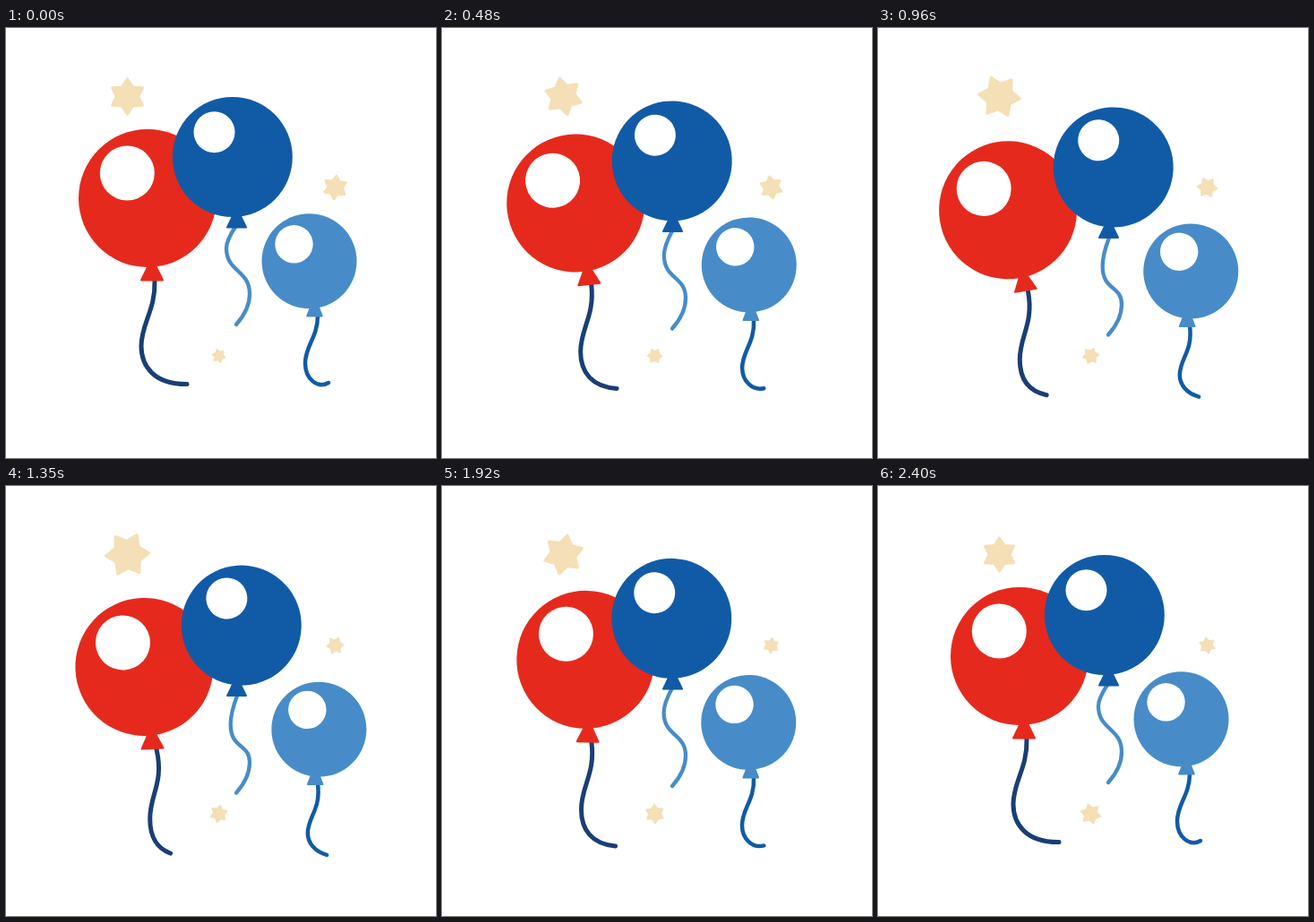
Animation of 480x480 px, one loop 2.43 s. Source, as an HTML page with a canvas:

```html
<!DOCTYPE html>
<html lang="en">
<head>
<meta charset="utf-8">
<title>Balloons</title>
<style>
  html, body { margin: 0; height: 100%; overflow: hidden; background: #fff; }
  canvas { display: block; }
</style>
</head>
<body>
<canvas id="stage" width="480" height="480"></canvas>
<script>
const ctx = document.getElementById('stage').getContext('2d');
const LOOP = 2430, STEP = 30;
const RED = '#e52a1d', BLUE = '#115ba6', SKY = '#478cc8', NAVY = '#1a3e75', SAND = '#f4dfb6';

const mix = (a, b, k) => a + (b - a) * k;
const smooth = k => (1 - Math.cos(Math.PI * k)) / 2;

// Interpolates between [time, value] keys.
function track(t, keys, ease = smooth) {
  for (let i = 1; i < keys.length; i++) {
    const [t0, a] = keys[i - 1], [t1, b] = keys[i];
    if (t <= t1) return mix(a, b, ease((t - t0) / (t1 - t0)));
  }
  return keys[keys.length - 1][1];
}

function disc(x, y, r, color) {
  ctx.fillStyle = color;
  ctx.beginPath();
  ctx.arc(x, y, r, 0, 2 * Math.PI);
  ctx.fill();
}

function star(x, y, radius, degrees) {
  const edge = radius * 0.14;
  ctx.beginPath();
  for (let i = 0; i < 12; i++) {
    const r = i % 2 ? radius * 0.58 : radius - edge / 2;
    const a = degrees * Math.PI / 180 + i * Math.PI / 6;
    ctx.lineTo(x + r * Math.sin(a), y - r * Math.cos(a));
  }
  ctx.closePath();
  ctx.fillStyle = ctx.strokeStyle = SAND;
  ctx.lineWidth = edge;
  ctx.fill();
  ctx.stroke();
}

// Two joined Bezier curves, bent from one pose to the other.
function string(from, to, k, color, width) {
  const p = from.map((v, i) => mix(v, to[i], k));
  ctx.beginPath();
  ctx.moveTo(p[0], p[1]);
  ctx.bezierCurveTo(...p.slice(2, 8));
  ctx.bezierCurveTo(...p.slice(8));
  ctx.strokeStyle = color;
  ctx.lineWidth = width;
  ctx.stroke();
}

function knot(x, top, bottom, half, color) {
  ctx.beginPath();
  ctx.moveTo(x - 3, top);
  ctx.lineTo(x + 3, top);
  ctx.lineTo(x + half, bottom);
  ctx.lineTo(x - half, bottom);
  ctx.closePath();
  ctx.fillStyle = ctx.strokeStyle = color;
  ctx.lineWidth = 2;
  ctx.fill();
  ctx.stroke();
}

function tilted(x, y, degrees, paint) {
  ctx.save();
  ctx.translate(x, y);
  ctx.rotate(degrees * Math.PI / 180);
  ctx.translate(-x, -y);
  paint();
  ctx.restore();
}

function draw(t) {
  const sway = track(t, [[0, 0], [1155, 1], [2400, 0]]);
  const bend = track(t, [[0, 0], [1320, 1], [2400, 0]], k => k);
  const lean = track(t, [[0, 0], [820, -10], [1740, 2], [2400, 0]]);
  const spin = t / 2400;

  ctx.fillStyle = '#fff';
  ctx.fillRect(0, 0, 480, 480);
  ctx.lineCap = ctx.lineJoin = 'round';

  star(135.5, 76.5, track(t, [[0, 21], [1500, 25.7], [2430, 20]]), -60 * spin);
  star(367.5, 178, track(t, [[0, 14.5], [1900, 9.3], [2430, 9.7]]), 6 - 75 * spin);
  star(237.5, 366, track(t, [[0, 8.3], [2400, 12]], k => k), -15 - 60 * spin);

  ctx.save();
  ctx.translate(0, 12.3 * sway);

  string([166, 282, 167, 315, 151, 330, 151, 355, 151, 378, 166, 398, 202, 397.5],
         [168, 282, 177, 320, 161, 332, 161, 360, 161, 383, 170, 393, 183, 398.5], bend, NAVY, 5);
  tilted(163, 270, lean, () => {
    knot(163, 263, 281.5, 12, RED);
    disc(158, 190, 77, RED);
    disc(135.3, 162, 30.5, '#fff');
  });

  string([256, 222, 250, 231, 246, 238, 246, 246, 246, 272, 272, 270, 272, 297, 272, 310, 265, 322, 257, 331],
         [258, 223, 254, 234, 251, 244, 251, 255, 251, 283, 272, 276, 272, 297, 272, 310, 265, 322, 257, 331],
         sway, SKY, 4.3);
  knot(257.5, 207, 222.5, 10.5, BLUE);
  tilted(257.5, 218, 8.2 * sway, () => {
    disc(252.8, 144, 67, BLUE);
    disc(232.5, 116.3, 23, '#fff');
  });

  string([348, 321, 348, 345, 334, 355, 334, 374, 334, 392, 348, 403, 360, 396],
         [348, 321, 352, 350, 337, 358, 337, 376, 337, 386, 344, 396, 358, 400.5], sway, BLUE, 4.5);
  knot(344.5 + 0.7 * sway, 308, 321.5, 8.3, SKY);
  tilted(344.5, 316, 11.8 * sway, () => {
    disc(338.5, 260.2, 53, SKY);
    disc(321.5, 241.3, 21.2, '#fff');
  });

  ctx.restore();
}

// Two-curve strings take 14 values; a third curve is appended when given.
function string(from, to, k, color, width) {
  const p = from.map((v, i) => mix(v, to[i], k));
  ctx.beginPath();
  ctx.moveTo(p[0], p[1]);
  for (let i = 2; i < p.length; i += 6) ctx.bezierCurveTo(...p.slice(i, i + 6));
  ctx.strokeStyle = color;
  ctx.lineWidth = width;
  ctx.stroke();
}

const start = performance.now();
function frame() {
  const t = (performance.now() - start) % LOOP;
  draw(Math.floor(t / STEP) * STEP);
  requestAnimationFrame(frame);
}
frame();
</script>
</body>
</html>
```
